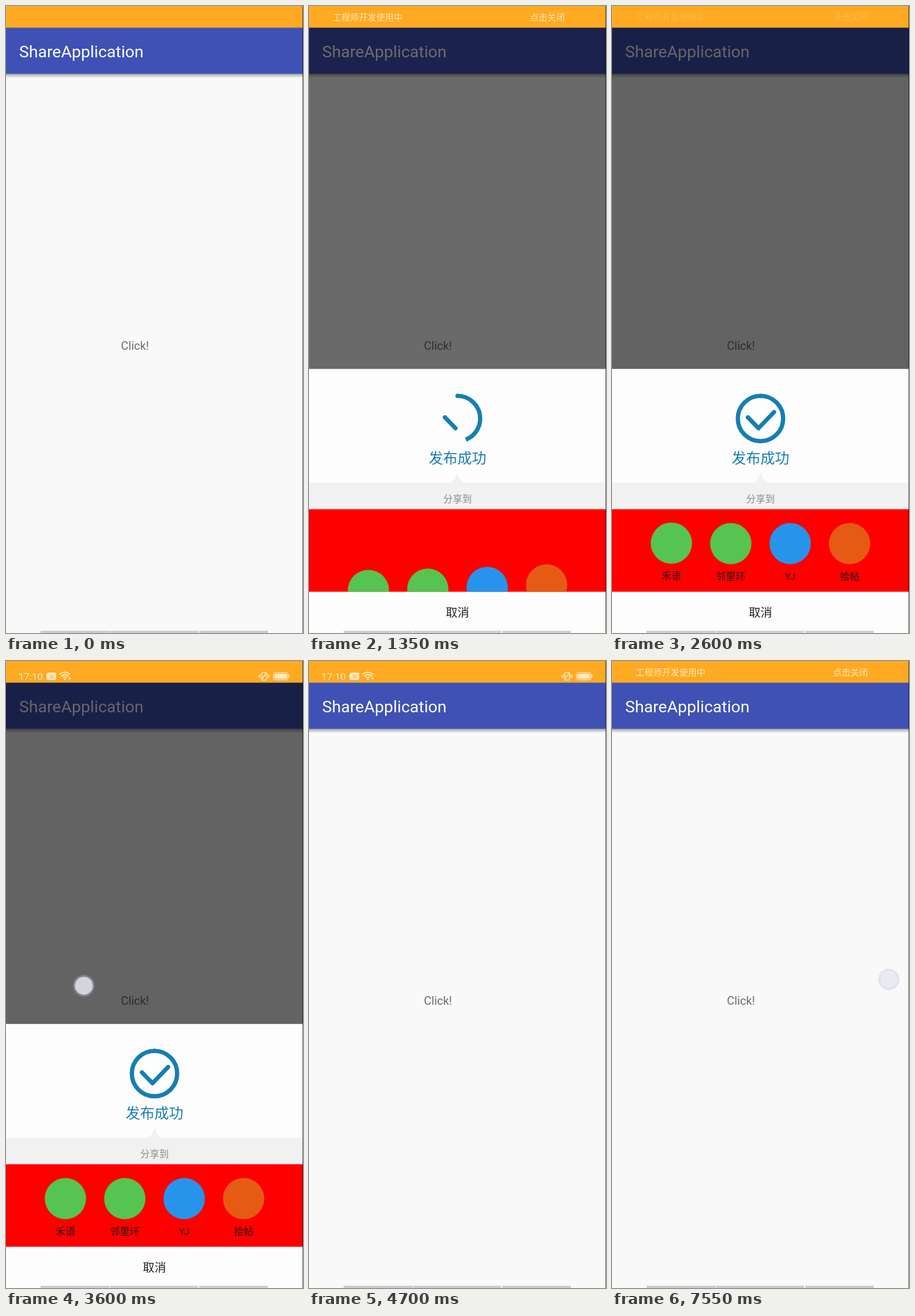
Animation, 515 px wide and 1087 px high, one loop 7600 ms. Source, as an HTML page with a canvas:

```html
<!DOCTYPE html>
<html lang="zh-CN">
<head>
<meta charset="utf-8">
<title>Share sheet</title>
<style>
html, body { margin: 0; width: 100%; height: 100%; overflow: hidden; background: #f9f9fa; }
canvas { display: block; }
</style>
</head>
<body>
<canvas id="stage" width="515" height="1087"></canvas>
<script>
const W = 515, H = 1087, LOOP = 7600;
const ctx = document.getElementById('stage').getContext('2d');

const STATUS_H = 37.6, TOOLBAR_END = 117.7;
const SHEET_TOP = 629.2, BAND_TOP = 826.7, TARGETS_TOP = 872.4, CANCEL_TOP = 1015.5;
const CENTER = W / 2;
const BLUE = '#177eb2';
const TARGETS = [
  { label: '禾语', color: '#56c451', x: 103, duration: 1400 },
  { label: '邻里环', color: '#56c451', x: 206, duration: 1200 },
  { label: 'YJ', color: '#2794ec', x: 309, duration: 1000 },
  { label: '拾帖', color: '#e55b13', x: 412, duration: 800 },
];

const ramp = (t, from, to) => Math.min(1, Math.max(0, (t - from) / (to - from)));
const easeOut = u => 1 - (1 - u) ** 2;
const easeOutBack = u => 1 + 2.70158 * (u - 1) ** 3 + 1.70158 * (u - 1) ** 2;

function rect(color, x, y, w, h) {
  ctx.fillStyle = color;
  ctx.fillRect(x, y, w, h);
}

function text(str, x, y, size, color, align = 'left') {
  ctx.font = `${size}px Roboto, "Noto Sans CJK SC", sans-serif`;
  ctx.textAlign = align;
  ctx.fillStyle = color;
  ctx.fillText(str, x, y);
}

function disc(color, x, y, r) {
  ctx.fillStyle = color;
  ctx.beginPath();
  ctx.arc(x, y, r, 0, 2 * Math.PI);
  ctx.fill();
}

function line(color, width, points) {
  ctx.strokeStyle = color;
  ctx.lineWidth = width;
  ctx.beginPath();
  points.forEach(([x, y]) => ctx.lineTo(x, y));
  ctx.stroke();
}

function roundBox(x, y, w, h, r) {
  ctx.beginPath();
  ctx.roundRect(x, y, w, h, r);
}

function drawApp() {
  rect('#f9f9fa', 0, 0, W, H);
  rect('#3f51b5', 0, 0, W, TOOLBAR_END);
  const shadow = ctx.createLinearGradient(0, TOOLBAR_END, 0, 125);
  shadow.addColorStop(0, 'rgba(0,0,0,.32)');
  shadow.addColorStop(1, 'rgba(0,0,0,0)');
  rect(shadow, 0, TOOLBAR_END, W, 8);
  text('ShareApplication', 22.8, 89, 28.5, '#fff');
  text('Click!', 199.3, 595.7, 20, '#6c6c6c');
}

function drawClock() {
  text('17:10', 21.5, 33, 17, '#fff');
  ctx.fillStyle = '#fff';
  roundBox(70, 20, 17, 13, [5, 2, 2, 2]);
  ctx.fill();
  line('#ffaa22', 1.6, [[76, 24], [82, 30]]);
  line('#ffaa22', 1.6, [[82, 24], [76, 30]]);

  ctx.strokeStyle = '#fff';
  ctx.lineWidth = 2;
  for (const r of [4.5, 8.5, 12.5]) {
    ctx.beginPath();
    ctx.arc(102, 32, r, -Math.PI * .77, -Math.PI * .23);
    ctx.stroke();
  }
  disc('#fff', 102, 31.5, 1.7);
  line('#fff', 1.2, [[111, 27], [108.5, 30], [112, 30], [109.5, 33]]);

  // Vibrate symbol
  ctx.lineWidth = 1.5;
  roundBox(443.5, 20, 8, 13, 2);
  ctx.stroke();
  line('#fff', 1.5, [[443, 33], [452, 19]]);
  for (const [dx, h] of [[6.5, 4], [9, 2]]) {
    for (const side of [-1, 1]) {
      const x = 447.5 + side * dx;
      line('#fff', 1.3, [[x, 26.5 - h], [x, 26.5 + h]]);
    }
  }

  ctx.lineWidth = 1.3;
  roundBox(463.7, 20.2, 25.5, 12.3, 3.5);
  ctx.stroke();
  roundBox(465.5, 22, 22, 8.7, 2);
  ctx.fillStyle = '#fff';
  ctx.fill();
  rect('#fff', 490, 24.5, 1.5, 4);
}

function drawStatusBar(t) {
  rect('#ffaa22', 0, 0, W, STATUS_H);
  const notice = t < 4000
    ? ramp(t, 50, 500) - ramp(t, 2300, 2700)
    : ramp(t, 5950, 6500);
  const clock = ramp(t, 3100, 3550) - ramp(t, 5300, 5750);
  ctx.globalAlpha = notice * .72;
  text('工程师开发使用中', 41, 25.2, 15.15, '#fff');
  text('点击关闭', 383, 25.2, 15.15, '#fff');
  ctx.globalAlpha = clock * .72;
  drawClock();
  ctx.globalAlpha = 1;
}

function drawCheck(progress) {
  if (progress <= 0) return;
  ctx.strokeStyle = BLUE;
  ctx.lineWidth = 7.4;
  ctx.beginPath();
  ctx.arc(CENTER, 715.2, 39.3, -Math.PI / 2, (progress * 2 - .5) * Math.PI);
  ctx.stroke();
  disc(BLUE, CENTER, 675.9, 3.7);

  const corner = .44;
  const first = ramp(progress, 0, corner), second = ramp(progress, corner, 1);
  const points = [[235.7, 713.2], [235.7 + 18.3 * first, 713.2 + 18.8 * first]];
  if (second) points.push([254 + 27 * second, 732 - 28 * second]);
  ctx.lineCap = ctx.lineJoin = 'round';
  line(BLUE, 7.4, points);
  ctx.lineCap = 'butt';
  ctx.lineJoin = 'miter';
}

function drawTargets(t) {
  ctx.save();
  ctx.beginPath();
  ctx.rect(0, TARGETS_TOP, W, CANCEL_TOP - TARGETS_TOP);
  ctx.clip();
  for (const { label, color, x, duration } of TARGETS) {
    const dy = 95 * (1 - easeOutBack(ramp(t, 1306, 1306 + duration)));
    disc(color, x, 932 + dy, 35.8);
    text(label, x, 995 + dy, 17, '#201c1c', 'center');
  }
  ctx.restore();
}

function drawSheet(t) {
  const shown = easeOut(ramp(t, 1100, 1350)) - ramp(t, 3600, 3750) ** 2;
  if (shown <= 0) return;
  ctx.save();
  ctx.translate(0, (1 - shown) * (H - SHEET_TOP));
  rect('#fdfdfd', 0, SHEET_TOP, W, H - SHEET_TOP);
  rect('#f1f1f2', 0, BAND_TOP, W, TARGETS_TOP - BAND_TOP + 1);
  ctx.beginPath();
  ctx.moveTo(CENTER - 14, 827);
  ctx.quadraticCurveTo(CENTER - 3, 823, CENTER, 809);
  ctx.quadraticCurveTo(CENTER + 3, 823, CENTER + 14, 827);
  ctx.fill();
  rect('#ff0000', 0, TARGETS_TOP, W, CANCEL_TOP - TARGETS_TOP);
  drawCheck(ramp(t, 1155, 1600));
  text('发布成功', CENTER, 792.8, 25, BLUE, 'center');
  text('分享到', CENTER, 860.8, 16.5, '#8b8b8b', 'center');
  drawTargets(t);
  text('取消', CENTER, 1059.3, 20.2, '#222', 'center');
  ctx.restore();
}

function drawTouch(x, y, alpha) {
  if (alpha <= 0) return;
  ctx.globalAlpha = alpha;
  const glow = ctx.createRadialGradient(x, y, 15, x, y, 20);
  glow.addColorStop(0, 'rgba(185,192,232,.6)');
  glow.addColorStop(1, 'rgba(185,192,232,0)');
  disc(glow, x, y, 20);
  disc('rgba(246,246,242,.64)', x, y, 15.3);
  ctx.globalAlpha = 1;
}

function draw(t) {
  drawApp();
  const dim = .6 * (easeOut(ramp(t, 1100, 1420)) - ramp(t, 3610, 3840));
  rect(`rgba(0,0,0,${dim})`, 0, 0, W, H);
  drawStatusBar(t);
  drawSheet(t);
  for (const [x, w] of [[60, 120], [181, 152], [335, 119]]) {
    rect('rgba(0,0,0,.18)', x, 1083, w, 4);
  }
  drawTouch(135, 563, ramp(t, 3380, 3430) - ramp(t, 3880, 4050));
  drawTouch(480, 552, ramp(t, 7450, 7550));
  rect('rgba(0,0,0,.6)', 514, 0, 1, H);
}

function tick() {
  draw(performance.now() % LOOP);
  requestAnimationFrame(tick);
}
tick();
</script>
</body>
</html>
```
